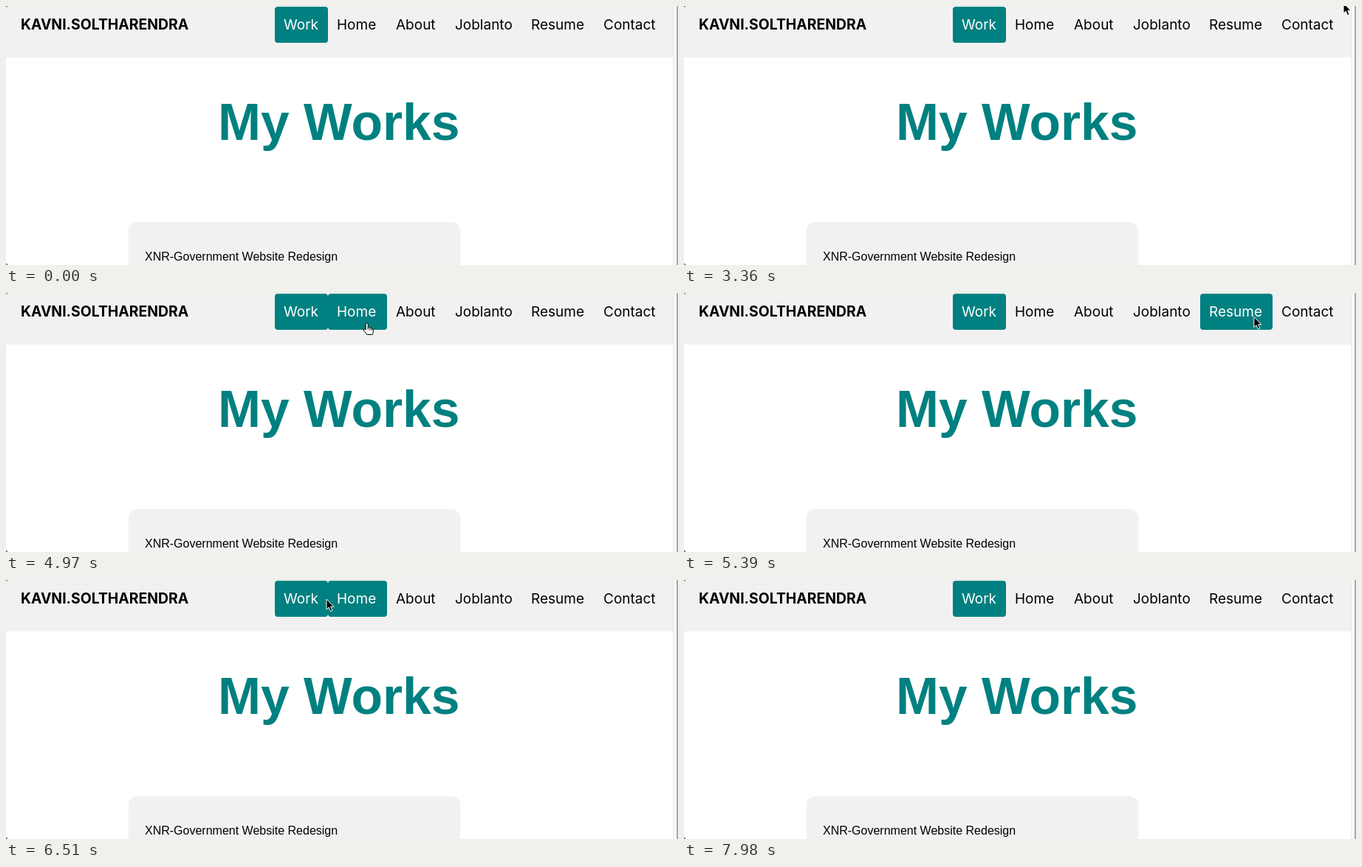
Animation, 910 px wide and 352 px high, one loop 8 s. Source, as an HTML page:

```html
<!DOCTYPE html>
<html lang="en">
<head>
<meta charset="utf-8">
<title>My Works</title>
<style>
  html, body { margin: 0; width: 100%; height: 100%; overflow: hidden; background: #fff; }
  svg { display: block; width: 910px; height: 352px; }
  .nav { font: 19px Inter, sans-serif; }
  .brand { font: bold 19.4px Inter, sans-serif; }
  .title { font: bold 69.6px "Liberation Sans", Arial, sans-serif; fill: #008080; }
  .card { font: 16px "Liberation Sans", Arial, sans-serif; }
  .nav rect { fill: none; }
  .nav .on rect { fill: #008080; }
  .nav .on text { fill: #fff; }
</style>
</head>
<body>
<svg viewBox="0 0 910 352">
  <rect width="904" height="70" fill="#f1f1f1"/>
  <text class="brand" x="20" y="32">KAVNI.SOLTHARENDRA</text>
  <g class="nav" id="nav"></g>

  <text class="title" x="287" y="181.5">My Works</text>

  <rect x="165" y="294" width="451" height="80" rx="12" fill="#f8f8f8"/>
  <rect x="166.5" y="294" width="448" height="80" rx="11" fill="#f1f1f1"/>
  <text class="card" x="188" y="345.5">XNR-Government Website Redesign</text>

  <!-- window edges -->
  <rect x="903.5" width="1" height="352" fill="#dedede"/>
  <rect x="904.5" width="3.5" height="352" fill="#fafafa"/>
  <rect x="908" width="2" height="352" fill="#a8a8a8"/>
  <path d="M0 0H3L0 2ZM0 352V349L3 352Z" fill="#777"/>

  <g id="cursor">
    <path id="arrow" d="M0 0V14L3.2 11.1 5.4 16.6 8 15.5 5.7 10.2H10Z"
      fill="#000" stroke="#fff" stroke-linejoin="round"/>
    <path id="hand" d="M-.8 8V1Q-.8-.6.7-.6T2.2 1V5.3Q3.4 4.2 4.8 5.8 6.3 4.9 7.2 6.5 9.3 6 9.3 8.5
      V11Q9.3 13 8 15H.8Q-.6 12.5-3.3 9.8-4.4 8-2.9 7.4-1.9 7.2-.8 8.5ZM2.2 5V8.5M4.8 6V9M7.2 6.7V9.3"
      fill="#fff" stroke="#000" stroke-linejoin="round"/>
  </g>
</svg>
<script>
const LOOP = 8000, STEP = 70;
const el = id => document.getElementById(id);

const labels = ["Work", "Home", "About", "Joblanto", "Resume", "Contact"];
const edges = [364, 436, 516, 596, 699, 797, 893];
el("nav").innerHTML = labels.map((label, i) =>
  `<g><rect x="${edges[i]}" y="1" width="${edges[i + 1] - edges[i]}" height="49" rx="4"/>
   <text x="${edges[i] + 12}" y="32">${label}</text></g>`
).join("");
const links = [...el("nav").children];

const off = { x: 920, y: 355 }, page = { x: 768, y: 268 };
const above = { x: 895, y: -24 }, corner = { x: 893, y: -4 };
const home = { x: 488, y: 41.5 }, contact = { x: 837, y: 30.5 };
const seam = { x: 434, y: 26 }, below = { x: 470, y: 64 };

// Pointer trips: start, end, destination
const trips = [
  [840, 1470, page], [1680, 2100, off],
  [2800, 3150, above], [3290, 3360, corner], [3360, 3710, off],
  [4270, 4970, home], [4970, 5950, contact], [5950, 6510, seam],
  [6510, 6720, below], [6860, 7350, contact], [7490, 7840, off]
];

const easeOut = k => 1 - (1 - k) ** 3;
const mix = (a, b, k) => a + (b - a) * k;

function pointer(t) {
  let at = off;
  for (const [start, end, to] of trips) {
    if (t < start) break;
    const k = easeOut(Math.min(1, (t - start) / (end - start)));
    at = { x: mix(at.x, to.x, k), y: mix(at.y, to.y, k) };
  }
  return at;
}

function draw(now) {
  const { x, y } = pointer(Math.floor(now % LOOP / STEP) * STEP);
  const overNav = y > 1 && y < 50;
  links.forEach((link, i) => {
    const hover = overNav && x + 3 >= edges[i] && x + 3 < edges[i + 1];
    link.classList.toggle("on", i === 0 || hover);
  });
  // The hand appears once the pointer settles on Home
  const settled = Math.hypot(x - home.x, y - home.y) < 6;
  el("cursor").setAttribute("transform", `translate(${x} ${y})`);
  el("arrow").style.display = settled ? "none" : "";
  el("hand").style.display = settled ? "" : "none";
  requestAnimationFrame(draw);
}
draw(performance.now());
</script>
</body>
</html>
```
